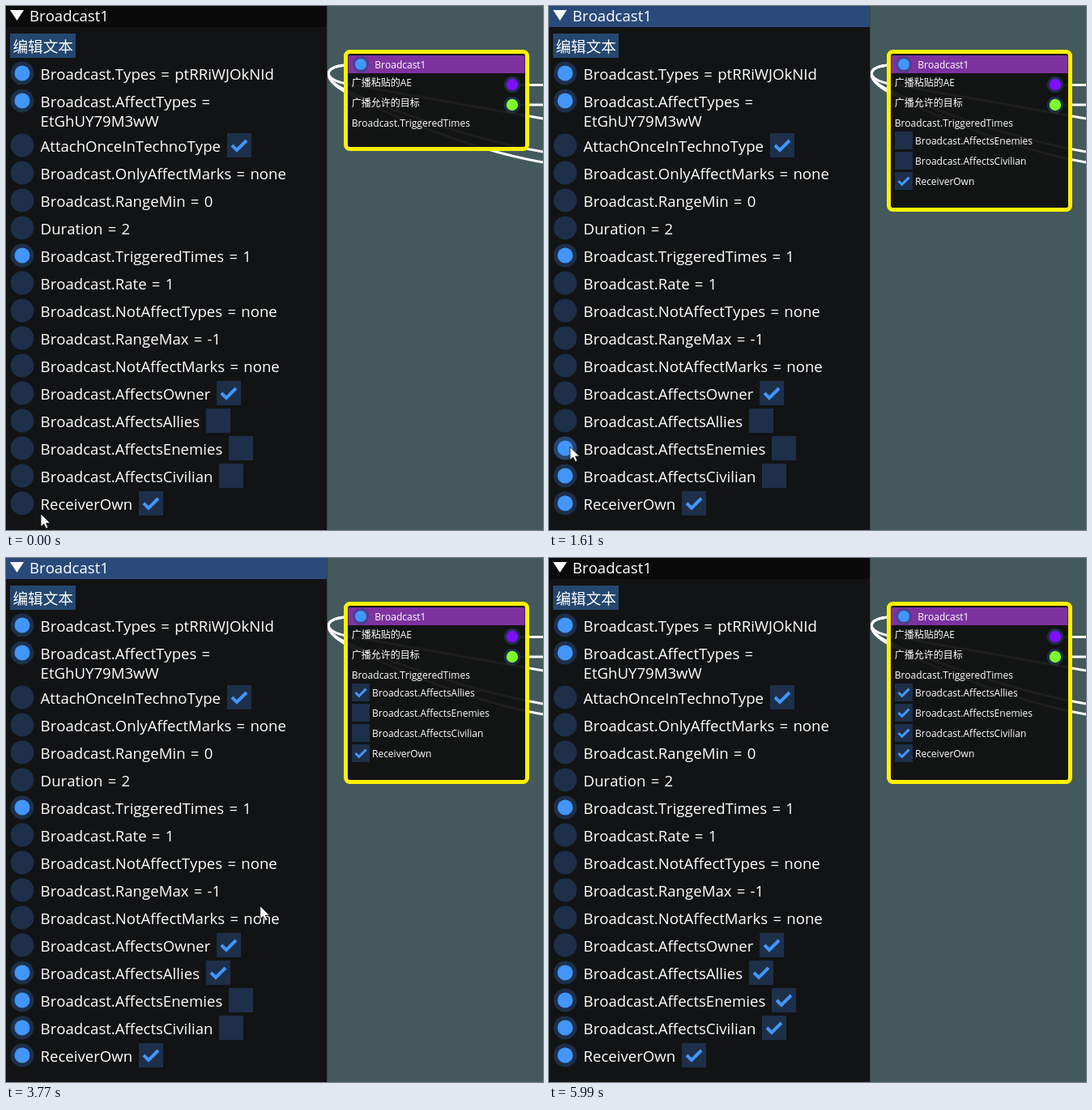
Write an HTML page that moves like this. It is 663 by 647 pixels and loops after 7610 ms.

```html
<!DOCTYPE html>
<html lang="zh-CN">
<head>
<meta charset="utf-8">
<title>Broadcast node</title>
<style>
html, body { margin: 0; width: 100%; height: 100%; overflow: hidden; background: #43595b; }
svg { display: block; width: 663px; height: 647px; }
text {
  fill: #fff; font-family: "Open Sans", "Noto Sans CJK SC", "Noto Sans CJK", sans-serif;
  font-kerning: none; font-variant-ligatures: none; white-space: pre;
}
.big { font-size: 18.6px; word-spacing: 1.4px; }
.small { font-size: 12px; }
</style>
</head>
<body>
<svg id="stage" viewBox="0 0 663 647"></svg>
<script>
const LOOP = 7610;
const COLOR = { idle: '#1d2f49', hover: '#25466e', active: '#306aad', mark: '#4296fa' };
const ROW = 34, LINE = 21, NODE_ROW = 25, NODE_TOP = 155;
const PRESS = 80; // time a control stays pressed before its click takes effect
const LAG = 55;   // delay before the radio and the node height follow a click

const stage = document.getElementById('stage');

function add(parent, tag, attrs, content) {
  const el = document.createElementNS('http://www.w3.org/2000/svg', tag);
  for (const key in attrs) el.setAttribute(key, attrs[key]);
  if (content) el.textContent = content;
  return parent.appendChild(el);
}
const group = parent => add(parent, 'g', {});
const rect = (parent, x, y, width, height, fill) => add(parent, 'rect', { x, y, width, height, fill });
const circle = (parent, cx, cy, r, fill) => add(parent, 'circle', { cx, cy, r, fill });
const label = (parent, x, y, size, content) => add(parent, 'text', { x, y, class: size }, content);
const show = (el, on) => el.setAttribute('visibility', on ? 'inherit' : 'hidden');

function checkbox(parent, x, y, size) {
  const g = add(parent, 'g', { transform: `translate(${x} ${y}) scale(${size / 30})` });
  return {
    box: rect(g, 0, 0, 30, 30, COLOR.idle),
    tick: add(g, 'path', { d: 'M6 15L12 21L24 9', fill: 'none', stroke: COLOR.mark, 'stroke-width': 4 })
  };
}

// link: time the radio is clicked, check: time the box is ticked; 0 means from the start
const rows = [
  { text: 'Broadcast.Types = ptRRiWJOkNId', link: 0 },
  { text: 'Broadcast.AffectTypes =', more: 'EtGhUY79M3wW', link: 0 },
  { text: 'AttachOnceInTechnoType', check: 0 },
  { text: 'Broadcast.OnlyAffectMarks = none' },
  { text: 'Broadcast.RangeMin = 0' },
  { text: 'Duration = 2' },
  { text: 'Broadcast.TriggeredTimes = 1', link: 0 },
  { text: 'Broadcast.Rate = 1' },
  { text: 'Broadcast.NotAffectTypes = none' },
  { text: 'Broadcast.RangeMax = -1' },
  { text: 'Broadcast.NotAffectMarks = none' },
  { text: 'Broadcast.AffectsOwner', check: 0 },
  { text: 'Broadcast.AffectsAllies', link: 2210, check: 3560 },
  { text: 'Broadcast.AffectsEnemies', link: 1530, check: 4640 },
  { text: 'Broadcast.AffectsCivilian', link: 1270, check: 5500 },
  { text: 'ReceiverOwn', link: 950, check: 0 }
];
const nodeRows = rows.filter(row => row.link);
const [allies, enemies, civilian, receiver] = nodeRows;

// Links
const links = add(stage, 'g', { fill: 'none', stroke: '#fff', 'stroke-width': 3 });
for (const y of [97.5, 122]) add(links, 'path', { d: `M625 ${y}H663` });
for (const end of [139, 180, 193]) {
  const bend = 96 + (end - 139) * .2;
  add(links, 'path', { d: `M420 73C390 75 392 91 420 ${bend}S560 ${end - 18} 663 ${end}` });
}

// Node
const node = group(stage);
const body = add(node, 'rect', { x: 419, y: 56, width: 225, rx: 5, fill: '#0f0f0f', 'fill-opacity': .94 });
rect(node, 422.5, 61, 218, 22, '#7e33a0');
circle(node, 438, 72, 10.3, 'rgba(41,74,122,.54)');
circle(node, 438, 72, 7, COLOR.mark);
label(node, 455.3, 77, 'small', 'Broadcast1');
['广播粘贴的AE', '广播允许的目标', 'Broadcast.TriggeredTimes'].forEach((text, i) =>
  label(node, 426.7, 99 + i * NODE_ROW, 'small', text));
['#7d10ff', '#7dff2d'].forEach((fill, i) => {
  const y = 97 + i * NODE_ROW;
  circle(node, 625, y, 10.3, COLOR.idle);
  circle(node, 625, y, 7.2, fill);
});
for (const row of nodeRows) {
  row.group = group(node);
  row.nodeBox = checkbox(row.group, 427, 0, 22);
  label(row.group, 452, 16, 'small', row.text);
}
const border = add(node, 'rect', {
  x: 419.5, y: 56.5, width: 224, rx: 5, fill: 'none', stroke: '#fff000', 'stroke-width': 5
});

// Panel
const panel = group(stage);
rect(panel, 0, 0, 397, 647, '#121314');
const title = rect(panel, 0, 0, 396, 26);
rect(panel, 396, 0, 1, 647, '#3b4148');
add(panel, 'path', { d: 'M5 5H22L13.5 18Z', fill: '#fff' });
label(panel, 29, 19, 'big', 'Broadcast1');
rect(panel, 5, 34, 81, 30, COLOR.hover);
label(panel, 8.5, 57, 'big', '编辑文本');

let y = 83;
for (const row of rows) {
  row.y = y;
  row.radio = circle(panel, 20, y, 14.4, COLOR.idle);
  row.dot = circle(panel, 20, y, 9.5, COLOR.mark);
  const text = label(panel, 42.6, y + 8, 'big', row.text);
  if ('check' in row) {
    row.boxX = Math.round(42.6 + text.getComputedTextLength() + 8);
    row.panelBox = checkbox(panel, row.boxX, y - 15, 30);
  }
  if (row.more) {
    label(panel, 42.6, y + 32, 'big', row.more);
    y += LINE;
  }
  y += ROW;
}

const cursor = add(stage, 'path', {
  d: 'M0 0V16L3.8 12.6L6.4 18.2L9 17L6.5 11.6H11.6Z',
  fill: '#fff', stroke: '#111', 'stroke-width': .8
});

// Pointer
const onRadio = row => [26, row.y - 1];
const onBox = row => [row.boxX + 20, row.y - 2];
const onNodeBox = row => [439, NODE_TOP + NODE_ROW * nodeRows.indexOf(row) + 9];
const home = [43, 627], exit = [574, 650];
const moves = [
  { start: 210, end: 930, to: onRadio(receiver) },
  { start: 940, end: 1060, to: onRadio(civilian) },
  { start: 1330, end: 1500, to: onRadio(enemies) },
  { start: 1590, end: 1870, to: onRadio(allies) },
  { start: 2660, end: 3020, to: [303, 536] },
  { start: 3020, end: 3200, to: onBox(allies) },
  { start: 3560, end: 4220, to: [461, 177] },
  { start: 4340, end: 4560, to: onNodeBox(enemies) },
  { start: 4640, end: 4850, to: onNodeBox(receiver) },
  { start: 4850, end: 5100, to: onNodeBox(civilian) },
  { start: 5500, end: 5990, to: exit }
];

const smooth = k => k * k * (3 - 2 * k);

function pointerAt(t) {
  return moves.reduce(([x, y], { start, end, to }) => {
    const k = smooth(Math.min(1, Math.max(0, (t - start) / (end - start))));
    return [x + (to[0] - x) * k, y + (to[1] - y) * k];
  }, home);
}

function render(t) {
  const [px, py] = pointerAt(t);
  const over = (x, y, w, h) => px >= x && px < x + w && py >= y && py < y + h;
  const tint = (el, hovered, click) => {
    const pressed = t >= click - PRESS && t < click;
    el.setAttribute('fill', hovered ? (pressed ? COLOR.active : COLOR.hover) : COLOR.idle);
  };
  const linked = row => row.link === 0 || t >= row.link + LAG;

  const focused = t >= receiver.link - PRESS && t < enemies.check - PRESS;
  title.setAttribute('fill', focused ? '#294a7a' : '#0a0a0a');

  for (const row of rows) {
    tint(row.radio, over(6, row.y - 14, 28, 28), row.link);
    show(row.dot, linked(row));
    if (!row.panelBox) continue;
    tint(row.panelBox.box, over(row.boxX, row.y - 15, 30, 30), row.check);
    show(row.panelBox.tick, t >= row.check);
  }

  let top = NODE_TOP;
  for (const row of nodeRows) {
    const visible = t >= row.link;
    show(row.group, visible);
    if (!visible) continue;
    row.group.setAttribute('transform', `translate(0 ${top})`);
    tint(row.nodeBox.box, over(427, top, 170, 23), row.check);
    show(row.nodeBox.tick, t >= row.check);
    top += NODE_ROW;
  }

  const height = 120 + NODE_ROW * nodeRows.filter(linked).length;
  border.setAttribute('height', height);
  body.setAttribute('height', height + 1);

  cursor.setAttribute('transform', `translate(${px} ${py})`);
  show(cursor, t < 5990);
}

const began = performance.now();
function tick() {
  render((performance.now() - began) % LOOP);
  requestAnimationFrame(tick);
}
tick();
</script>
</body>
</html>
```
